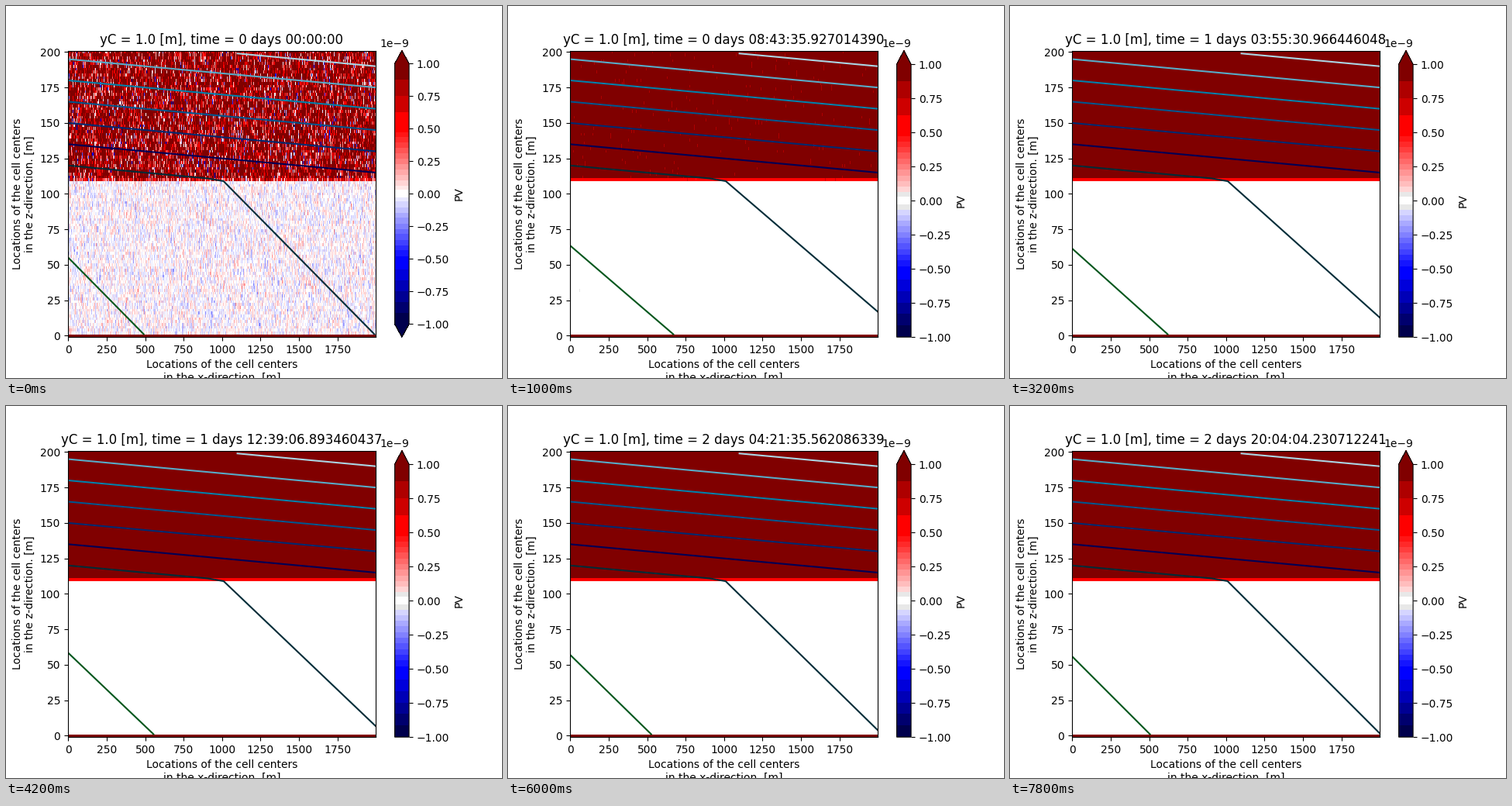
Animation, 640 px wide and 480 px high, one loop 8 s. Source, as a matplotlib script:

```python
import numpy as np
import matplotlib.pyplot as plt
from matplotlib.animation import FuncAnimation
from matplotlib.cm import ScalarMappable
from matplotlib.colors import ListedColormap, Normalize

FRAMES, INTERVAL = 40, 200
STEP = 628318540287797          # model time per frame, in units of 1e-11 s
SLOPE, BURGER, DEPTH = 0.01, 0.1, 110
DX, DZ = 4, 2

x_face = np.arange(-DX / 2, 2000, DX)
z_face = np.arange(-DZ / 2, 202, DZ)
z_mid = z_face[:-1] + DZ / 2
x_line = np.arange(0, 1999, 1.0)
LEVELS = 105 + 15 * np.arange(8)


def banded(grey):
    """Seismic colours in bands, wider towards both ends."""
    v = np.linspace(-1, 1, 400)
    a = np.abs(v)
    fine = np.round(a * 24) / 24
    red = np.select([a > 0.875, a > 0.75, a > 0.625, a > 0.47],
                    [1, 0.8125, 0.6875, 0.5], fine)
    blue = np.where(a > 0.5, 0.5 + np.floor((a - 0.5) * 12) / 10, fine)
    q = np.where(v > 0, red, -np.minimum(blue, 1))
    rgb = plt.get_cmap("seismic")((q + 1) / 2)
    rgb[a < 0.03] = 1
    if grey:
        rgb[(a >= 0.03) & (a < 0.065), :3] = 0.91
    return ListedColormap(rgb)


def stratification(n):
    """Ratio of lower to upper buoyancy gradient, swinging inertially."""
    base = BURGER / (1 + BURGER)
    phase = 2 * np.pi * n / 10 * np.sqrt(1 + BURGER)
    return base + base**2 * (1 - np.cos(phase))


def isopycnal(level, ratio):
    top, bottom = DEPTH + 1, DEPTH - 1
    b = [DEPTH - ratio * bottom, DEPTH - ratio, top, 199]
    return np.interp(level - SLOPE * x_line, b, [1, bottom, top, 199],
                     left=np.nan, right=np.nan)


def potential_vorticity(n):
    rng = np.random.default_rng(n + 7)
    e = rng.normal(size=(len(z_mid) + 1, len(x_face) - 1))
    noise = (e[1:] + e[:-1]) / np.sqrt(2)
    mean = np.select([z_mid < 1, z_mid < DEPTH, z_mid == DEPTH], [3, 0, 0.55], 1.01)
    spread = np.select([z_mid < 1, z_mid < DEPTH, z_mid == DEPTH],
                       [0.1, 0.075, 0.3], 0.6)
    decay = (1 + n) ** -1.3
    return 1e-9 * (mean[:, None] + decay * spread[:, None] * noise)


def clock(n):
    sec, nano = divmod((n * STEP + 50) // 100, 10**9)
    day, sec = divmod(sec, 86400)
    text = f"{day} days {sec // 3600:02}:{sec // 60 % 60:02}:{sec % 60:02}"
    return text + (f".{nano:09}" if nano else "")


plt.rcParams["font.family"] = "DejaVu Sans"
fig = plt.figure(figsize=(6.4, 4.8), dpi=100)
ax = fig.add_axes([0.125, 0.11, 0.62, 0.77])
norm = Normalize(-1e-9, 1e-9)
cmaps = [banded(False), banded(True)]

mesh = ax.pcolormesh(x_face, z_face, potential_vorticity(0), cmap=cmaps[0], norm=norm)
ocean = plt.get_cmap("ocean")
lines = [ax.plot([], [], color=ocean((k + 1) / 9), lw=1.5)[0]
         for k in range(len(LEVELS))]
ax.set_xlim(x_face[0], x_face[-1])
ax.set_ylim(z_face[0], z_face[-1])
ax.set_xticks(range(0, 2000, 250))
ax.set_yticks(range(0, 201, 25))
ax.set_xlabel("Locations of the cell centers\nin the x-direction. [m]")
ax.set_ylabel("Locations of the cell centers\nin the z-direction. [m]")
title = ax.set_title("")

bars = []
for cmap, extend in zip(cmaps, ["both", "max"]):
    cax = fig.add_axes([0.78375, 0.11, 0.028875, 0.77])
    bar = fig.colorbar(ScalarMappable(norm, cmap), cax=cax, extend=extend, label="PV")
    bar.set_ticks(np.linspace(-1e-9, 1e-9, 9))
    bars.append(cax)


def update(n):
    later = int(n > 0)
    for i, cax in enumerate(bars):
        cax.set_visible(i == later)
    mesh.set_cmap(cmaps[later])
    mesh.set_array(potential_vorticity(n))
    ratio = stratification(n)
    for line, level in zip(lines, LEVELS):
        line.set_data(x_line, isopycnal(level, ratio))
    title.set_text(f"yC = 1.0 [m], time = {clock(n)}")
    return [mesh, title, *lines]


anim = FuncAnimation(fig, update, frames=FRAMES, interval=INTERVAL,
                     init_func=lambda: update(0), repeat=True, repeat_delay=0)
plt.show()
```
